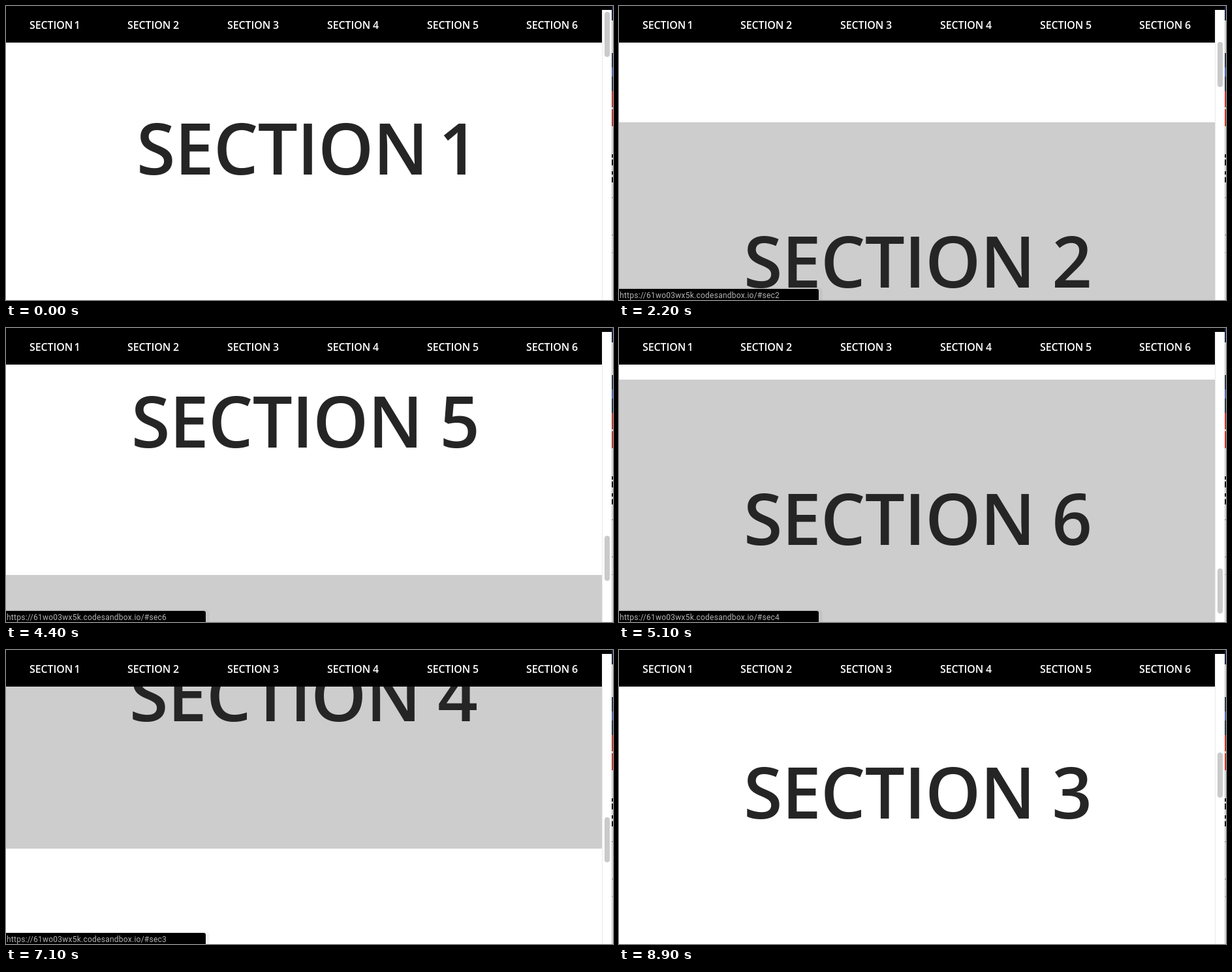
Recreate the animation shown at these times as an HTML page. Size 930 by 450 pixels, loop 9.3 s.

```html
<!DOCTYPE html>
<html lang="en">
<head>
<meta charset="utf-8">
<title>Smooth scrolling sections</title>
<style>
  html, body { margin: 0; width: 100%; height: 100%; overflow: hidden; background: #fff; }
  svg { display: block; width: 930px; height: 450px; }
  text { font-family: "Open Sans", "Noto Sans", sans-serif; font-weight: 600; white-space: pre; }
  .title { font-size: 108px; letter-spacing: -0.8px; fill: #252525; }
  .link { font-size: 16px; letter-spacing: -0.12px; fill: #fff; }
  .url { font: 400 12px Roboto, "Noto Sans", sans-serif; letter-spacing: 0.25px; fill: #b4b4b4; }
</style>
</head>
<body>
<svg id="stage" viewBox="0 0 930 450"></svg>
<script>
const LOOP = 9300, STEP = 100;
const SECTION = 448, PAGE_TOP = 5, BASELINE = 253;
const THUMB_TOP = 9, THUMB_RATIO = 0.1657;

// Clicks: [start in ms, section scrolled to]
const moves = [
  [2000, 2], [2600, 3], [3300, 4], [3800, 5], [4300, 6],
  [5000, 4], [5760, 5], [6900, 3], [7628, 1], [8300, 3]
];

// Hovered links: [start in ms, section], 0 hides the status bar
const hovers = [
  [0, 0], [1500, 1], [1700, 2], [2500, 3], [3100, 4], [3800, 5], [4200, 6],
  [4900, 5], [5000, 4], [5500, 5], [6300, 0], [6700, 3], [7500, 2],
  [7600, 1], [7900, 2], [8200, 3], [8900, 0]
];

const stage = document.getElementById('stage');

function add(parent, tag, attrs, text) {
  const node = document.createElementNS('http://www.w3.org/2000/svg', tag);
  for (const key in attrs) node.setAttribute(key, attrs[key]);
  if (text) node.textContent = text;
  parent.appendChild(node);
  return node;
}

function rect(parent, x, y, width, height, fill, rx = 0) {
  return add(parent, 'rect', { x, y, width, height, fill, rx });
}

// The narrow digit 1 sits closer to the word
function label(parent, x, y, style, number) {
  const text = add(parent, 'text', { x, y, class: style }, 'SECTION ');
  add(text, 'tspan', { dx: number === 1 ? '-0.1em' : '-0.01em' }, String(number));
}

// Page
rect(stage, 0, 0, 930, 450, '#fff');
const page = add(stage, 'g', {});
[200, 191, 191, 189, 192, 191].forEach((x, i) => {
  const top = PAGE_TOP + i * SECTION;
  rect(page, 0, top, 913, SECTION, i % 2 ? '#cdcdcd' : '#fff');
  label(page, x, top + BASELINE, 'title', i + 1);
});

// Navigation
rect(stage, 0, 0, 913, 56, '#000');
rect(stage, 0, 0, 928, 6, '#000');
[36, 186, 339, 492, 645, 797].forEach((x, i) => label(stage, x, 34.5, 'link', i + 1));

// Scrollbar
rect(stage, 913, 6, 15, 444, '#fff');
rect(stage, 913, 6, 1, 444, '#e8e8e8');
const thumb = rect(stage, 917, THUMB_TOP, 8, 69, '#cacaca', 4);

// Window behind, visible along the right edge
rect(stage, 928, 0, 2, 450, '#e9e9e9');
rect(stage, 928, 0, 1, 450, '#bdbdbd');
[
  [0, 22, '#1c2747'], [72, 22, '#303a4c'], [94, 14, '#5068b4'], [108, 22, '#303a4c'],
  [130, 25, '#c23a2d'], [158, 26, '#c23a2d'], [227, 5, '#111'], [235, 9, '#111'],
  [253, 5, '#111'], [262, 8, '#111'], [293, 1, '#777'], [350, 1, '#777'], [377, 1, '#999']
].forEach(([y, height, fill]) => rect(stage, 928, y, 2, height, fill));

// Status bar
const status = add(stage, 'g', {});
rect(status, -4, 431, 316, 24, 'rgba(0,0,0,.04)', 6);
rect(status, -4, 433, 310, 22, '#000', 3);
const url = add(status, 'text', { x: 1, y: 447, class: 'url' });

// cubic-bezier(.42, 0, .58, 1), solved by bisection
function easeInOut(p) {
  let low = 0, high = 1;
  for (let i = 0; i < 24; i++) {
    const s = (low + high) / 2, r = 1 - s;
    const x = 1.26 * s * r * r + 1.74 * s * s * r + s * s * s;
    if (x < p) low = s; else high = s;
  }
  return low * low * (3 - 2 * low);
}

// Longer distances take longer, up to 720 ms
function scrollAt(time) {
  let scroll = 0;
  for (const [start, section] of moves) {
    if (time <= start) break;
    const distance = (section - 1) * SECTION - scroll;
    const duration = Math.min(Math.sqrt(Math.abs(distance)) / 60, 0.72) * 1000;
    const p = (time - start) / duration;
    scroll += p >= 1 ? distance : distance * easeInOut(p);
  }
  return Math.round(scroll);
}

function render(time) {
  const scroll = scrollAt(time);
  page.setAttribute('transform', `translate(0 ${-scroll})`);
  thumb.setAttribute('y', Math.round(THUMB_TOP + scroll * THUMB_RATIO));

  const hovered = hovers.filter(([start]) => start <= time).pop()[1];
  status.setAttribute('visibility', hovered ? 'visible' : 'hidden');
  url.textContent = `https://61wo03wx5k.codesandbox.io/#sec${hovered}`;
}

const origin = performance.now();
function tick() {
  const time = (performance.now() - origin) % LOOP;
  render(Math.floor(time / STEP) * STEP);
  requestAnimationFrame(tick);
}
tick();
</script>
</body>
</html>
```
